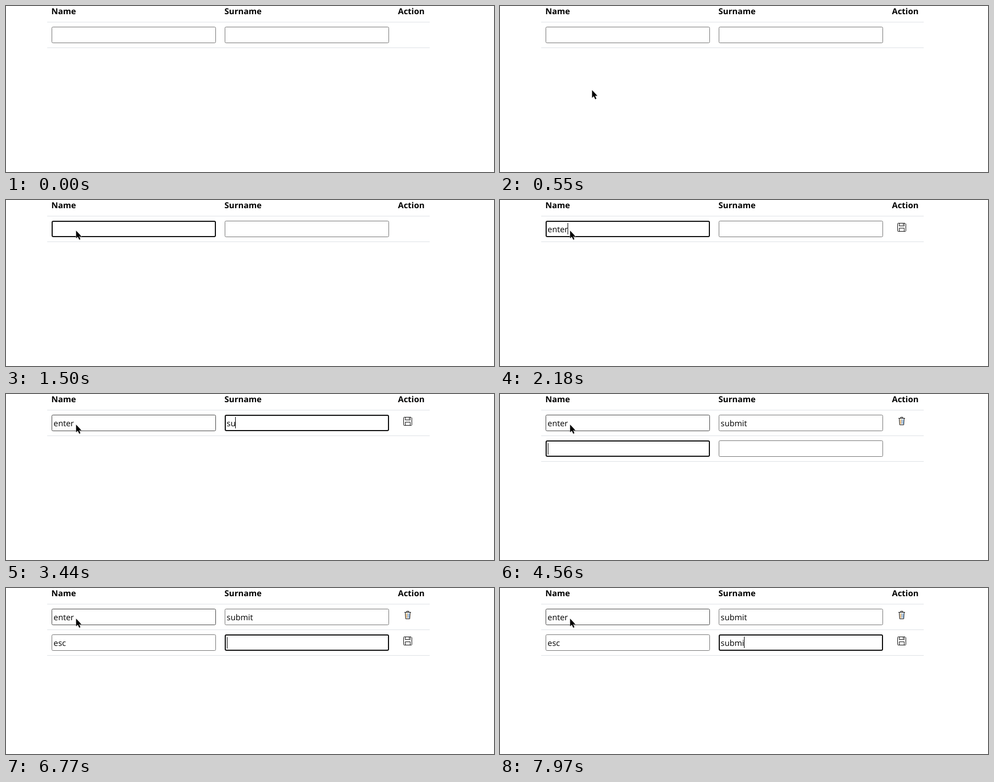
An HTML page that plays this animation: 888x304 px, repeating every 8000 ms.

```html
<!DOCTYPE html>
<html lang="en">
<head>
<meta charset="utf-8">
<title>Editable table</title>
<style>
  html, body { margin: 0; width: 100%; height: 100%; overflow: hidden; background: #fff; }
  svg { display: block; width: 888px; height: 304px; }
  text { font-family: "Open Sans", "Noto Sans", sans-serif; font-size: 14.8px; text-rendering: geometricPrecision; white-space: pre; }
  .head { font-size: 15px; font-weight: 700; }
  .rule { fill: #dee2e6; }
  .box { fill: #fff; }
  .icon { fill: none; stroke: #111; stroke-width: 1; }
</style>
</head>
<body>
<svg viewBox="0 0 888 304">
  <defs>
    <g id="save" class="icon">
      <path d="M1.5.5H14L15.5 2V14.5Q15.5 15.5 14.5 15.5H1.5Q.5 15.5 .5 14.5V1.5Q.5.5 1.5.5Z"/>
      <path d="M3.5.5V5.5H12.5V.5M10.5 1.5V4M3.5 15.5V9.5H12.5V15.5"/>
    </g>
    <g id="trash" class="icon">
      <path d="M2 2.5H14M6 2V.5H10V2"/>
      <path d="M3.5 3L4.3 14.5H11.7L12.5 3"/>
      <path stroke="#f0a030" d="M5.5 4.5V13"/>
      <path stroke="#555" d="M8 4.5V13"/>
      <path stroke="#3a8ee0" d="M10.5 4.5V13"/>
    </g>
  </defs>
  <rect width="888" height="304" fill="#fff"/>
  <text class="head" x="82.5" y="15">Name</text>
  <text class="head" x="397.6" y="15">Surname</text>
  <text class="head" x="713.3" y="15">Action</text>
  <rect class="rule" x="75" y="29" width="696" height="1"/>
  <g id="rows"></g>
  <rect id="caret" width="1" height="21"/>
  <path id="pointer" d="M0 0V14.2L3.2 11.3L5.7 16.8L8 15.8L5.5 10.4H9.8Z" stroke="#fff" stroke-width="1" paint-order="stroke"/>
</svg>
<script>
const LOOP = 8000, BLINK = 530, ROW_H = 47;
const NEW_ROW = 4560;
const COLS = [83, 398];

// [time, field, text]; fields run left to right, row by row
const EDITS = [
  [970, 0, ""], ...typed(0, "enter", [1630, 1760, 1960, 2110, 2180]),
  [2580, 1, ""], ...typed(1, "submit", [3240, 3440, 3570, 3770, 3970, 4030]),
  [NEW_ROW, 2, ""], ...typed(2, "esc", [5620, 5820, 6020]),
  [6770, 3, ""], ...typed(3, "submi", [7300, 7370, 7570, 7770, 7970])
];

function typed(field, word, times) {
  return times.map((t, i) => [t, field, word.slice(0, i + 1)]);
}

const $ = id => document.getElementById(id);
const caret = $("caret"), pointer = $("pointer");

function add(parent, tag, attrs) {
  const el = document.createElementNS("http://www.w3.org/2000/svg", tag);
  set(el, attrs);
  parent.append(el);
  return el;
}

function set(el, attrs) {
  for (const k in attrs) el.setAttribute(k, attrs[k]);
}

function show(el, on) {
  el.style.display = on ? "" : "none";
}

function makeRow(i) {
  const top = 38 + i * ROW_H;
  const g = add($("rows"), "g", {});
  const fields = COLS.map(x => ({
    x, top,
    box: add(g, "rect", { class: "box" }),
    label: add(g, "text", { x: x + 3.6, y: top + 21 })
  }));
  add(g, "rect", { class: "rule", x: 75, y: top + 38, width: 696, height: 1 });
  const icon = add(g, "use", { x: 723, y: top + 4 });
  return { g, fields, icon };
}

const rows = [0, 1].map(makeRow);
const fields = rows.flatMap(r => r.fields);

function drawBox(f, focused, hovered) {
  const w = focused ? 2 : 1;
  set(f.box, {
    x: f.x + w / 2, y: f.top + w / 2, width: 299 - w, height: 30 - w, rx: 2,
    "stroke-width": w,
    stroke: focused ? "#101010" : hovered ? "#484848" : "#767676"
  });
}

function pointerAt(t) {
  const step = Math.min(10, Math.floor((t - 200) / 70));
  const u = 1 - Math.pow(1 - step / 10, 1.7), v = 1 - u;
  const curve = (a, b, c) => Math.round(v * v * a + 2 * u * v * b + u * u * c);
  return { x: curve(580, 120, 127), y: curve(252, 242, 56) };
}

function draw(t) {
  const texts = ["", "", "", ""];
  let focus = -1, last = 0;
  for (const [at, field, text] of EDITS) {
    if (at > t) break;
    texts[field] = text;
    focus = field;
    last = at;
  }

  const visible = t >= 200;
  const p = pointerAt(Math.max(t, 200));
  show(pointer, visible);
  set(pointer, { transform: `translate(${p.x + 0.5} ${p.y})` });

  show(rows[1].g, t >= NEW_ROW);
  fields.forEach((f, i) => {
    const over = visible && p.x >= f.x && p.x < f.x + 299 && p.y >= f.top && p.y < f.top + 30;
    drawBox(f, i === focus, over);
    f.label.textContent = texts[i];
  });

  rows.forEach((r, i) => {
    show(r.icon, texts[i * 2] !== "");
    set(r.icon, { href: i === 0 && t >= NEW_ROW ? "#trash" : "#save" });
  });

  const on = focus >= 0 && Math.floor((t - last) / BLINK) % 2 === 0;
  show(caret, on);
  if (on) {
    const f = fields[focus];
    const end = f.x + 3.6 + (texts[focus] ? f.label.getComputedTextLength() : 0);
    const drop = focus > 1 && !texts[focus] ? 5 : 4;
    set(caret, { x: Math.max(f.x + 4, Math.floor(end)), y: f.top + drop });
  }
}

const start = performance.now();
function tick() {
  draw((performance.now() - start) % LOOP);
  requestAnimationFrame(tick);
}
tick();
</script>
</body>
</html>
```
